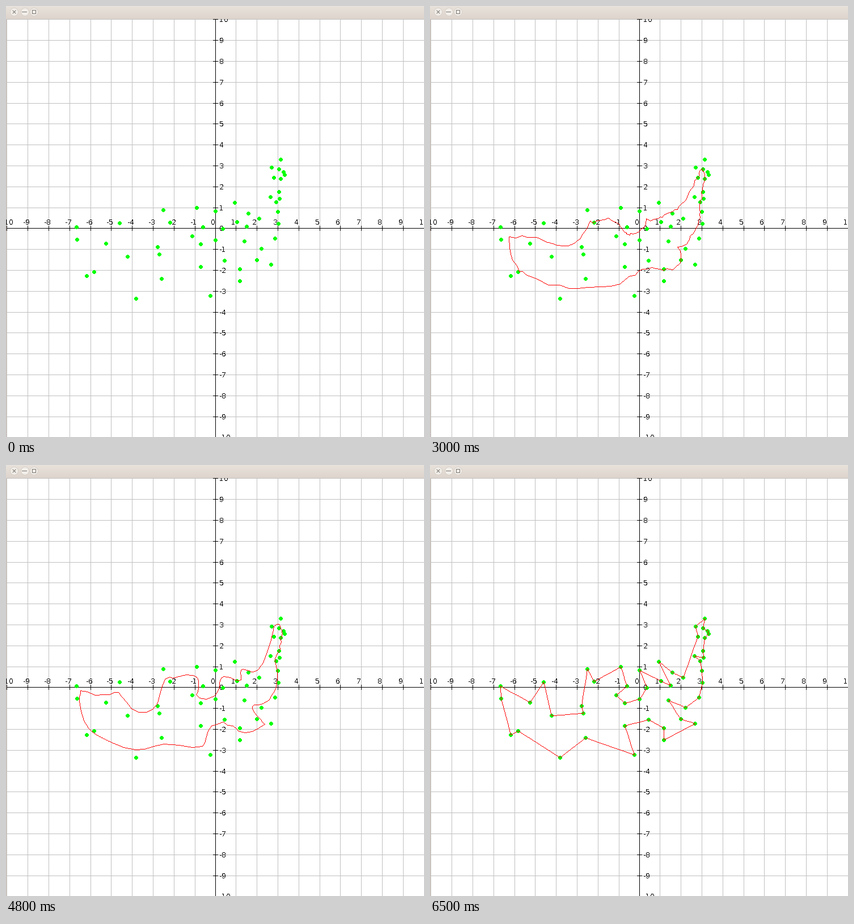
Recreate the animation shown at these times as a matplotlib script. Size 737 px wide and 759 px high, loop 7.9 s.

```python
import numpy as np
import matplotlib.pyplot as plt
from matplotlib.animation import FuncAnimation

W, H, DPI = 737, 759, 64
PX = 72 / DPI                      # points per pixel
X0, Y0, UNIT, BAR = 369, 391, 36.8, 23
FRAMES, INTERVAL = 79, 100
GREEN, RED, BLACK = (0, 255, 0), (255, 0, 0), (0, 0, 0)
GRID, EDGE = (192, 192, 192), (207, 195, 187)
BAR_TOP, BAR_LOW = np.array([231, 226, 219]), np.array([221, 212, 205])

plt.rcParams.update({"font.family": "DejaVu Sans", "text.hinting": "native",
                     "text.hinting_factor": 1})

# Cities in the order of the finished tour.
CITIES = np.array([
    (124, 389), (176, 418), (200, 382), (214, 441), (270, 437), (267, 424),
    (277, 359), (289, 381), (336, 355), (347, 389), (328, 405), (343, 419),
    (369, 412), (382, 392), (369, 361), (407, 380), (424, 388), (403, 346),
    (427, 365), (446, 374), (472, 302), (468, 284), (484, 270), (481, 287),
    (489, 292), (491, 297), (484, 304), (481, 327), (482, 339), (466, 336),
    (476, 345), (479, 362), (480, 383), (474, 409), (450, 427), (420, 414),
    (442, 447), (467, 455), (412, 484), (412, 463), (385, 448), (343, 459),
    (360, 510), (274, 480), (229, 515), (155, 468), (142, 475), (125, 411)])

# The solver advances in bursts: (first tick, number of steps).
BURSTS = [(8, 1), (10, 1), (13, 3), (17, 4), (22, 3), (30, 1), (33, 4),
          (38, 7), (46, 1), (48, 4), (53, 4), (58, 4), (63, 3)]
STARTS = [s + i for s, n in BURSTS for i in range(n)]
LAST = len(STARTS) - 1

# Ring nodes: a few per tour edge, with a centripetal parameter along it.
PER_EDGE = 3
edges = np.roll(CITIES, -1, axis=0) - CITIES
span = np.sqrt(np.hypot(*edges.T))
span /= span.mean()
city_u = np.cumsum(span) - span
t = np.arange(PER_EDGE) / PER_EDGE
nodes = (CITIES[:, None] + edges[:, None] * t[:, None]).reshape(-1, 2)
node_u = (city_u[:, None] + span[:, None] * t).ravel()
weight = np.repeat(span, PER_EDGE)


def gap(a, b):
    """Shortest signed distance along the closed ring."""
    total = span.sum()
    return (a - b + total / 2) % total - total / 2


def outline(step):
    """The tour, smoothed less at each step and tugged by a few cities."""
    rng = np.random.default_rng(step)
    reach = 1.9 * (1 - step / LAST) + 0.8 * 0.3 ** step
    d = gap(node_u[:, None], node_u[None, :]) / max(reach, 1e-6)
    k = np.exp(-d * d / 2) * weight
    pts = k @ nodes / k.sum(axis=1, keepdims=True)
    pts += rng.normal(0, 0.9 * reach, pts.shape)
    for c in rng.choice(len(CITIES), 10, replace=False):
        tug = 0.3 * np.exp(-np.abs(gap(node_u, city_u[c])) / 0.25)
        pts += tug[:, None] * (CITIES[c] - pts)
    return pts


def draw_ring(img, pts):
    """Closed polyline, one solid pixel wide."""
    pts = np.rint(pts)
    for a, b in zip(pts, np.roll(pts, -1, axis=0)):
        n = int(np.abs(b - a).max()) + 1
        x, y = np.rint(np.linspace(a, b, n)).astype(int).T
        img[y, x] = (*RED, 255)


def make_plane():
    img = np.full((H, W, 3), 255, np.uint8)
    ticks = [(X0 + int(UNIT * k), round(Y0 + 0.4 - UNIT * k), k)
             for k in range(-10, 11)]
    for x, y, _ in ticks:
        img[:, x:x + 1] = GRID
        img[y:y + 1] = GRID
    img[Y0] = BLACK
    img[:, X0] = BLACK
    for x, y, _ in ticks:
        img[Y0 - 4:Y0 + 5, x:x + 1] = BLACK
        img[y:y + 1, X0 - 4:X0 + 5] = BLACK
    img[:, 0] = EDGE
    return img, ticks


def make_overlay():
    img = np.zeros((H, W, 4), np.uint8)
    shade = np.linspace(0, 1, BAR)[:, None]
    img[:BAR, :, :3] = (BAR_TOP + (BAR_LOW - BAR_TOP) * shade)[:, None]
    img[:BAR, :, 3] = 255
    dy, dx = np.mgrid[-3:4, -3:4]
    disc = dx * dx + dy * dy < 12.5
    for x, y in CITIES:
        img[y - 3:y + 4, x - 3:x + 4][disc] = (*GREEN, 255)
    return img


def label(x, y, k):
    ax.text(x - 0.5, y - 0.5, str(k), fontsize=12 * PX, color="black",
            ha="left", va="baseline", antialiased=False, zorder=2,
            clip_on=True)


def show(img, z):
    return ax.imshow(img, extent=(-0.5, W - 0.5, H - 0.5, -0.5),
                     aspect="auto", interpolation="nearest", zorder=z)


def draw_buttons():
    for x in (14, 32, 49):
        ax.plot(x, 10, "o", ms=14 * PX, mfc="#f1ede8", mec="#d5ccc4",
                mew=0.8 * PX, zorder=4)
    pen = dict(color="#77726c", lw=PX, zorder=5)
    ax.plot([11.5, 16.5], [7.5, 12.5], **pen)
    ax.plot([11.5, 16.5], [12.5, 7.5], **pen)
    ax.plot([28, 36], [10, 10], **pen)
    ax.plot([46, 52, 52, 46, 46], [7, 7, 13, 13, 7], **pen)


fig = plt.figure(figsize=(W / DPI, H / DPI), dpi=DPI, facecolor="white")
ax = fig.add_axes([0, 0, 1, 1])
plane, ticks = make_plane()
overlay = make_overlay()
show(plane, 1)
for tx, ty, value in ticks:
    label(tx - 8, Y0 - 6, value)
    label(X0 + 7, ty + 5, value)
layer = show(overlay, 3)
draw_buttons()
ax.set_xlim(-0.5, W - 0.5)
ax.set_ylim(H - 0.5, -0.5)
ax.axis("off")


def update(n):
    step = sum(s <= n for s in STARTS) - 1
    img = overlay.copy()
    if step >= 0:
        draw_ring(img, outline(step))
    layer.set_data(img)
    return [layer]


anim = FuncAnimation(fig, update, frames=FRAMES, interval=INTERVAL,
                     init_func=lambda: update(0), repeat=True, repeat_delay=0)
plt.show()
```
